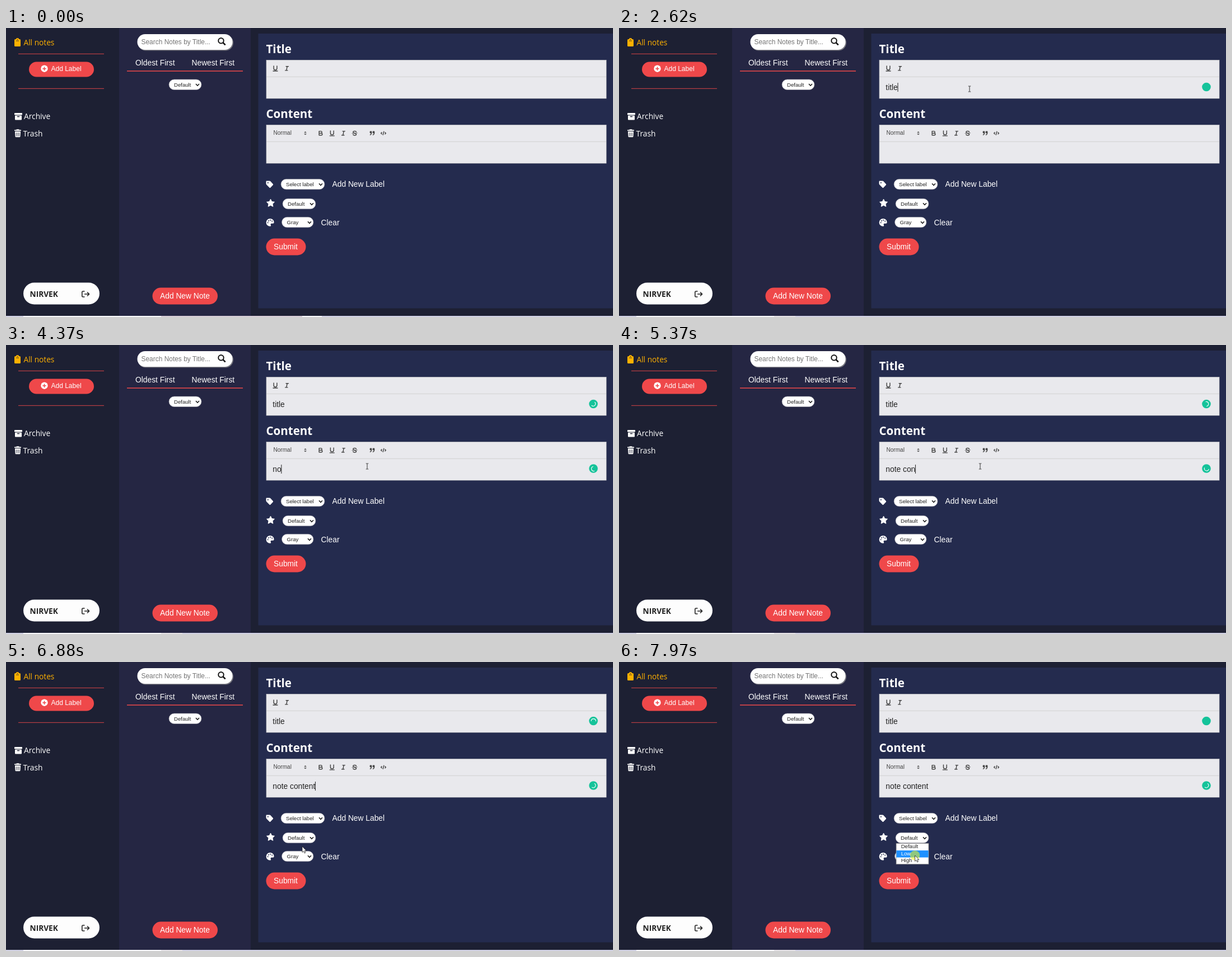
An HTML page for the animation above (8 s loop, 1084 px wide and 517 px high).

```html
<!DOCTYPE html>
<html lang="en">
<head>
<meta charset="utf-8">
<title>Notes</title>
<style>
  html, body { margin: 0; width: 100%; height: 100%; overflow: hidden; background: #1d2033; }
  svg { display: block; width: 1084px; height: 517px; }
  text { font: 13.8px "Liberation Sans", Arial, sans-serif; fill: #fff; white-space: pre; }
  .open { font-family: "Open Sans", sans-serif; }
  .bold { font-weight: 700; }
  .tool { fill: none; stroke: #444; stroke-width: 2; stroke-linecap: round; stroke-linejoin: round; }
  .tool .solid { fill: #444; }
</style>
</head>
<body>
<svg id="stage" viewBox="0 0 1084 517"></svg>
<script>
const LOOP = 8000;
const SIDE = '#1d2033', RED = '#ef484a', ORANGE = '#ffb100', GREEN = '#15c39a';
const stage = document.getElementById('stage');

const rect = (x, y, w, h, fill, r = 0, more = '') =>
  `<rect x="${x}" y="${y}" width="${w}" height="${h}" rx="${r}" fill="${fill}" ${more}/>`;
const path = (d, fill = '#fff', more = '') => `<path d="${d}" fill="${fill}" ${more}/>`;
const line = (d, stroke, width) => path(d, 'none', `stroke="${stroke}" stroke-width="${width}"`);
const disc = (x, y, r, fill) => `<circle cx="${x}" cy="${y}" r="${r}" fill="${fill}"/>`;
const text = (x, y, s, size = 13.8, fill = '#fff', cls = '') =>
  `<text x="${x}" y="${y}" class="${cls}" style="font-size:${size}px;fill:${fill}">${s}</text>`;

const select = (x, y, w, label) =>
  rect(x, y, w, 18.5, '#fff', 9.2, 'stroke="#8b8b98" stroke-width=".6"') +
  text(x + 9, y + 12.8, label, 9.6, '#222') +
  line(`M${x + w - 10} ${y + 8}l3 3.2 3-3.2`, '#111', 1.5);

const editor = y =>
  rect(465, y + .5, 607, 68.5, '#e9e9ed', 0, 'stroke="#ccc" stroke-width=".7"') +
  line(`M465 ${y + 30.3}h607`, '#ccc', .8);

const TOOLS = {
  bold: '<path d="M5 4H9.5a2.5 2.5 0 0 1 0 5H5ZM5 9h5.5a2.5 2.5 0 0 1 0 5H5Z"/>',
  underline: '<path d="M5 3V9a4 4 0 0 0 8 0V3M3.5 15.5h11" />',
  italic: '<path d="M7 4h6M5 14h6M8 14 10 4"/>',
  strike: '<path d="M13 6C12.4 3.2 5 3.2 5 6.5 5 9.5 13 8.5 13 11.8 13 15 5.4 14.8 5 12"/><path d="M2.5 9.5l13-1" stroke-width="1"/>',
  quote: '<path class="solid" d="M4 5h3v3H4ZM11 5h3v3h-3Z"/><path d="M7 8c0 4-3 5-3 5M14 8c0 4-3 5-3 5"/>',
  code: '<path d="M5 7 3 9 5 11M13 7l2 2-2 2M10 5 8 13"/>',
  picker: '<path class="solid" stroke-width="1" d="M7 11l2 2 2-2ZM7 7l2-2 2 2Z"/>'
};
const tool = (name, x, y) =>
  `<g class="tool" transform="translate(${x} ${y}) scale(.72) translate(-9 -9)">${TOOLS[name]}</g>`;

const star = (x, y, r) => 'M' + Array.from({ length: 10 }, (_, i) => {
  const a = i * Math.PI / 5 - Math.PI / 2, k = i % 2 ? r * .5 : r;
  return [x + k * Math.cos(a), y + k * Math.sin(a)].map(v => v.toFixed(2));
}).join('L') + 'Z';

const sidebar =
  rect(15, 20, 11, 13, ORANGE, 1.5) + rect(18, 18, 5, 4.5, ORANGE, 1.5) + disc(20.5, 20.5, .8, SIDE) +
  line('M18 23h5', SIDE, .8) +
  text(31.5, 30.5, 'All notes', 13.7, ORANGE, 'open') +
  line('M22 46.3h153M22 108.3h153', RED, .9) +
  rect(41, 60.5, 116, 27, RED, 13.5) + disc(68.5, 72.7, 6.2, '#fff') +
  line('M65.3 72.7h6.4M68.5 69.5v6.4', RED, 1.6) + text(80.5, 77, 'Add Label', 12) +
  rect(15, 152, 14, 3.6, '#fff', .8) + rect(16, 156.4, 12, 8, '#fff', 1) + rect(19.7, 157.8, 4.6, 1.4, SIDE, .7) +
  text(32, 163, 'Archive', 13.8, '#fff', 'open') +
  rect(15, 182.3, 12, 1.8, '#fff', .6) + rect(18.5, 181.2, 5, 2, '#fff', .6) +
  path('M16 185h10l-.6 9.2q-.1 1-1.1 1h-6.600q-1 0-1.100-1Z') +
  line('M18.600 187v6.500M21 187v6.500M23.400 187v6.500', SIDE, .8) +
  text(30.5, 193.500, 'Trash', 13.800, '#fff', 'open') +
  rect(31, 455.500, 136, 39, '#fdfdfd', 19.500) +
  text(42.500, 481, 'NIRVEK', 13.700, '#222', 'open bold') +
  line('M140.500 471h-3q-1.700 0-1.700 1.700v6.600q0 1.700 1.700 1.700h3M140 476h8M145 472.500l3.500 3.500-3.500 3.500', '#222', 1.600);

const list =
  rect(202, 0, 235, 515, '#252643') +
  rect(235.500, 12.500, 170.500, 28, '#77777f', 14) + rect(234.500, 11, 170, 28, '#fff', 14) +
  text(241.500, 29.300, 'Search Notes by Title...', 11.950, '#757575') +
  `<circle cx="384" cy="22.700" r="4.700" fill="none" stroke="#111" stroke-width="2"/>` +
  line('M387.500 26.200l4.200 4.200', '#111', 2.600) +
  text(231, 67, 'Oldest First') + text(331.500, 67, 'Newest First') +
  line('M216 77h207', RED, 1.500) +
  select(291, 92, 58, 'Default') +
  rect(261.500, 464.500, 116.500, 30, RED, 15) + text(275, 484.300, 'Add New Note');

const form =
  rect(450.500, 10, 633.500, 491.500, '#242b4e') +
  text(464.500, 44.500, 'Title', 20.500, '#fff', 'open bold') + editor(57) +
  tool('underline', 481, 72.300) + tool('italic', 501.500, 72.300) +
  text(464.500, 161, 'Content', 20.500, '#fff', 'open bold') + editor(173) +
  text(477.500, 191.300, 'Normal', 10.050, '#444') +
  ['picker', 'bold', 'underline', 'italic', 'strike', 'quote', 'code']
    .map((name, i) => tool(name, [534.500, 562, 582.300, 602.500, 622.700, 654, 674][i], 188.200)).join('') +
  path('M465.500 273.500h5q1 0 1.600.6l4.600 4.900q1 1 0 2l-4.300 4.400q-1 1-2 0l-5-5q-.9-.8-.9-1.700v-4.200q0-1 1-1Z') +
  disc(467.800, 276.800, 1.100, '#242b4e') +
  select(491, 270.300, 78, 'Select label') + text(582.500, 284, 'Add New Label') +
  path(star(472.500, 313.500, 7.300), '#fff', 'stroke="#fff" stroke-linejoin="round"') +
  select(494, 305.300, 59, 'Default') +
  path('M471.500 341a6.900 6.900 0 1 0 0 13.800c2 0 1.800-1.600 1.200-2.600-.6-1.300.2-2.500 1.600-2.500h2.300c1.300 0 2-.8 2-2 0-3.900-3.200-6.700-7.100-6.700Z') +
  [[467.600, 348.300], [468.800, 345], [472, 343.700], [475.200, 345.500]].map(([x, y]) => disc(x, y, 1, '#242b4e')).join('') +
  select(492.500, 338.300, 56.500, 'Gray') + text(562.500, 352.500, 'Clear') +
  rect(464.500, 376.500, 71, 30, RED, 15) + text(478, 396.200, 'Submit');

const taskbar = rect(0, 515, 1084, 2, '#d3d3e6') + rect(31, 515, 246, 2, '#fafaff') +
  rect(277, 515, 38, 2, '#e6e3e8') +
  `<g id="hover">${rect(277, 515, 252, 2, '#d9cfd8') + rect(529, 515, 35, 2, '#fafaff')}</g>`;

const badge = (id, y) => `<g id="${id}">${disc(1049, y, 7.800, GREEN)}
  <path id="${id}Arc" d="M1050 ${y - 4}A4.100 4.100 0 0 1 1047.500 ${y + 3.800}" fill="none" stroke="#fff"
    stroke-width="1.100" stroke-linecap="round"/></g>`;

const popup = `<g id="popup">${rect(495, 324.300, 58, 37.500, '#fff', 0, 'stroke="#777" stroke-width=".8"')}
  <rect id="mark" x="495.400" width="57.200" height="12.500" fill="#1e90ff"/>
  ${['Default', 'Low', 'High'].map((s, i) => text(503.700, 333.300 + i * 12.500, s, 9.600)).join('')}</g>`;

stage.innerHTML = rect(0, 0, 1084, 517, SIDE) + sidebar + list + form + taskbar +
  text(476.300, 111, '', 13.800, '#222').replace('<text', '<text id="titleText"') +
  text(476.300, 227, '', 13.800, '#222').replace('<text', '<text id="contentText"') +
  badge('titleBadge', 105.500) + badge('contentBadge', 221) +
  '<rect id="caret" width="1" height="16" fill="#222"/>' + popup +
  '<circle id="click" fill="#ff0" fill-opacity=".5"/><g id="cursor">' +
  `<g id="arrow">${path('M0 0V10.500L2.400 8.300 4 12 5.800 11.200 4.200 7.700H7.400Z', '#fff', 'stroke="#222" stroke-width=".8"')}</g>` +
  `<g id="beam">${line('M-2.200-5h1.500l.7.600.700-.600h1.500M0-4.500v9M-2.200 5h1.500l.7-.600.700.600h1.500', '#333', 1)}</g></g>`;

const $ = id => document.getElementById(id);
const show = (id, on) => $(id).setAttribute('visibility', on ? 'inherit' : 'hidden');
const set = (id, attrs) => { for (const k in attrs) $(id).setAttribute(k, attrs[k]); };

const PATH = [ // time, x, y
  [150, 966, 490], [900, 626, 109], [2700, 626, 109], [3120, 645, 198], [3600, 645, 198],
  [3800, 645, 217], [5950, 645, 217], [6450, 546, 303], [6880, 529, 330], [7080, 524, 343],
  [7380, 528, 317], [7600, 528, 317], [7850, 528.500, 346]
];
const CLICKS = [1020, 3840, 7460, 7880];
const FIELDS = [
  { id: 'title', word: 'title', keys: [1600, 1760, 1900, 2050, 2200], focus: 1100, blur: 3200, caretY: 98, spins: [[1750, 2400], [4050, 7500]], phase: -30 },
  { id: 'content', word: 'note content', keys: [4150, 4320, 4500, 4700, 4930, 5060, 5190, 5330, 5480, 5620, 5760, 5860], focus: 3900, blur: 7460, caretY: 214, spins: [[4250, LOOP]], phase: 90 }
];

function cursorAt(t) {
  const i = PATH.findIndex(p => p[0] > t);
  if (i < 0) return PATH[PATH.length - 1].slice(1);
  if (i === 0) return PATH[0].slice(1);
  const [t0, x0, y0] = PATH[i - 1], [t1, x1, y1] = PATH[i];
  const u = (t - t0) / (t1 - t0), e = u * u * (3 - 2 * u);
  return [x0 + (x1 - x0) * e, y0 + (y1 - y0) * e];
}

function drawField(f, t) {
  const typed = f.keys.filter(k => k <= t).length;
  const label = $(f.id + 'Text');
  label.textContent = f.word.slice(0, typed);
  show(f.id + 'Badge', t >= f.spins[0][0]);
  show(f.id + 'BadgeArc', t >= f.spins[0][0] && f.spins.some(([a, b]) => t >= a && t < b));
  set(f.id + 'BadgeArc', { transform: `rotate(${f.phase + (t - 5370) * .665} 1049 ${f.caretY + 7.300})` });
  if (t < f.focus || t >= f.blur) return;
  const lastKey = typed ? f.keys[typed - 1] : f.focus;
  show('caret', (t - lastKey) % 1000 < 500);
  set('caret', { x: 476 + (typed ? label.getComputedTextLength() : 0), y: f.caretY });
}

function draw(t) {
  const [x, y] = cursorAt(t);
  const inEditor = x > 465 && x < 1072 && (y > 87 && y < 126 || y > 203 && y < 242);
  show('cursor', t >= 150);
  show('arrow', !inEditor);
  show('beam', inEditor);
  set('cursor', { transform: `translate(${x} ${y})` });

  const click = CLICKS.find(c => t >= c && t < c + 220);
  set('click', { cx: x, cy: y, r: click === undefined ? 0 : 8.700 * Math.min(1, (t - click + 20) / 80) });

  show('hover', t < 980);
  show('caret', false);
  FIELDS.forEach(f => drawField(f, t));

  show('popup', t >= 7520);
  const row = Math.max(0, Math.min(2, Math.floor((y - 324.300) / 12.500)));
  set('mark', { y: 324.600 + row * 12.500 });
  $('popup').querySelectorAll('text').forEach((el, i) => el.style.fill = i === row ? '#fff' : '#222');
}

const start = performance.now();
function tick() {
  draw((performance.now() - start) % LOOP);
  requestAnimationFrame(tick);
}
tick();
</script>
</body>
</html>
```
